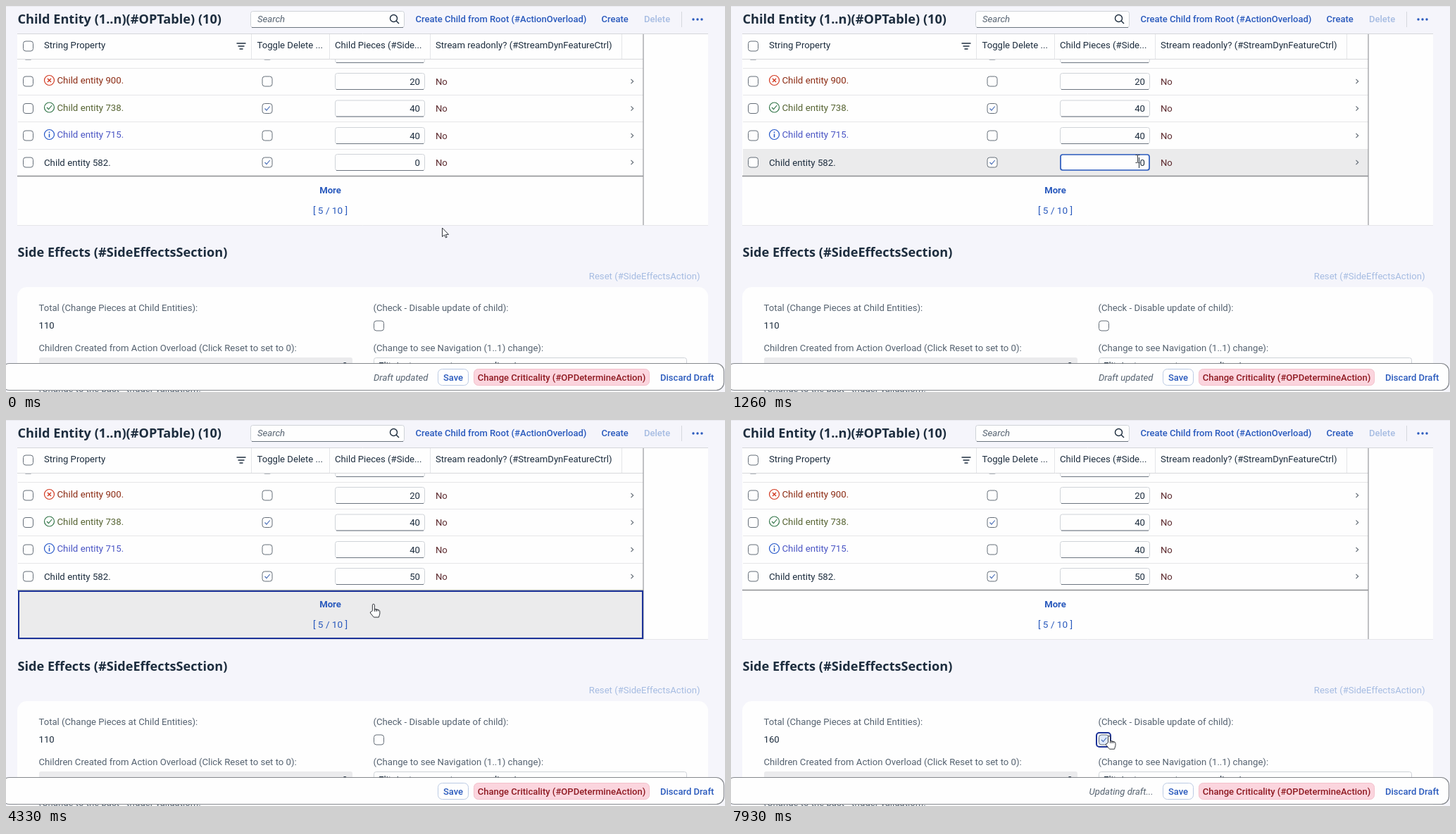
An HTML page with a canvas that plays this animation: 1021x548 px, repeating every 8 s.

```html
<!DOCTYPE html>
<html lang="en">
<head>
<meta charset="utf-8">
<title>Child entity table</title>
<style>
  html, body { margin: 0; width: 100%; height: 100%; overflow: hidden; background: #f5f5fb; }
  canvas { display: block; }
</style>
</head>
<body>
<canvas id="stage" width="1021" height="548"></canvas>
<script>
const ctx = document.getElementById('stage').getContext('2d');
const LOOP = 8000;
const INK = '#1d2d3e', LABEL = '#556270', BLUE = '#2a5abd', FOCUS = '#1d3399', FAINT_BLUE = '#a6bce2';
const PAGE = '#f5f5fb', WHITE = '#fefefe', HOVER = '#ebebec', EDGE = '#656e78', RULE = '#e6e6e8';
const TABLE_RIGHT = 905;

const rows = [
  { y: 107, name: 'Child entity 900.', color: '#8c2c14', icon: 'error', iconColor: '#d23a22', on: false, pieces: '20' },
  { y: 145.5, name: 'Child entity 738.', color: '#566332', icon: 'success', iconColor: '#34774a', on: true, pieces: '40' },
  { y: 184, name: 'Child entity 715.', color: '#4a55c4', icon: 'info', iconColor: '#2456c8', on: false, pieces: '40' },
  { y: 222, name: 'Child entity 582.', color: INK, on: true, pieces: '0' }
];

// Pointer hotspot: time, x, y
const pointerPath = [
  [0, 619.5, 315], [60, 619.5, 315], [600, 583, 166], [930, 577.5, 217], [3000, 577.5, 217],
  [3660, 530, 230], [3930, 530, 230], [4060, 524, 232], [4730, 518, 318], [5330, 515.5, 341],
  [5600, 518, 365], [6400, 532, 453], [7000, 532, 453], [7330, 536, 451], [7800, 536, 451],
  [7930, 537, 450], [LOOP, 537, 450]
];
const pointerShapes = {
  arrow: new Path2D('M0 0V12.5l3-2.5 2 4 1.7-.8-1.9-3.8H9z'),
  hand: new Path2D('M-1.5 8V0a1.5 1.5 0 0 1 3 0V5.5l5.5 1.2q2 .5 2 2.5v3l-1.5 5h-7l-5-6q-.5-2 1.5-2z'),
  beam: new Path2D('M-3-5.5H-1L0-5L1-5.5H3M0-5V5M-3 5.5H-1L0 5L1 5.5H3')
};

function text(str, x, y, { color = INK, style = '', size = 13.13, family = 'Roboto', align = 'left' } = {}) {
  ctx.font = `${style} ${size}px ${family}, sans-serif`;
  ctx.fillStyle = color;
  ctx.textAlign = align;
  ctx.fillText(str, x, y);
}
const heading = (str, y) => text(str, 16.5, y, { style: 'bold', size: 18.15, family: '"Noto Sans"' });
const button = (str, x, y, color = BLUE, align) => text(str, x, y, { color, style: '500', size: 13.03, align });

function fill(x, y, w, h, color) {
  ctx.fillStyle = color;
  ctx.fillRect(x, y, w, h);
}
function box(x, y, w, h, radius, color, border, width = 1) {
  ctx.beginPath();
  ctx.roundRect(x, y, w, h, radius);
  if (color) { ctx.fillStyle = color; ctx.fill(); }
  if (border) { ctx.strokeStyle = border; ctx.lineWidth = width; ctx.stroke(); }
}
function line(points, color, width = 1) {
  ctx.beginPath();
  for (let i = 0; i < points.length; i += 2) ctx.lineTo(points[i], points[i + 1]);
  ctx.strokeStyle = color;
  ctx.lineWidth = width;
  ctx.stroke();
}
function circle(x, y, r, color, width = 1.3) {
  ctx.beginPath();
  ctx.arc(x, y, r, 0, 2 * Math.PI);
  ctx.strokeStyle = color;
  ctx.lineWidth = width;
  ctx.stroke();
}
function clipped(x, y, w, h, draw) {
  ctx.save();
  ctx.beginPath();
  ctx.rect(x, y, w, h);
  ctx.clip();
  draw();
  ctx.restore();
}

function tick(x, y, color = '#4a6fb8') {
  line([x - 3.5, y, x - 1, y + 2.7, x + 3.7, y - 3], color, 1.15);
}
function checkbox(x, y, on, color = WHITE) {
  box(x - 7, y - 7, 14, 14, 3.5, color, EDGE, 1);
  if (on) tick(x, y);
}
function field(x, y, w, h, focused, hovered) {
  if (focused) return box(x + 1, y + 1, w - 2, h - 2, 3, WHITE, BLUE, 1.7);
  box(x + .5, y + .5, w - 1, h - 1, 3, WHITE, hovered ? '#b4c6e8' : '#cfd3d8');
  line([x + 2, y + h - .5, x + w - 2, y + h - .5], hovered ? '#7d9bd0' : '#6c7580');
}
function statusIcon({ icon, iconColor }, x, y) {
  circle(x, y, 7, iconColor, 1.2);
  if (icon === 'success') tick(x, y, iconColor);
  if (icon === 'error') {
    line([x - 2.5, y - 2.5, x + 2.5, y + 2.5], iconColor, 1.4);
    line([x + 2.5, y - 2.5, x - 2.5, y + 2.5], iconColor, 1.4);
  }
  if (icon === 'info') {
    line([x, y - 1, x, y + 4], iconColor, 1.5);
    line([x, y - 4, x, y - 2.3], iconColor, 1.5);
  }
}

function pointerAt(t) {
  const i = pointerPath.findIndex(p => p[0] > t);
  const [t0, x0, y0] = pointerPath[i - 1], [t1, x1, y1] = pointerPath[i];
  const u = (t - t0) / (t1 - t0), e = u * u * (3 - 2 * u);
  return { x: x0 + (x1 - x0) * e, y: y0 + (y1 - y0) * e };
}
const inside = (p, x, y, w, h) => p.x >= x && p.x <= x + w && p.y >= y && p.y < y + h;
const overField = (p, row) => inside(p, 467, row.y - 12, 128, 24);

function stateAt(t) {
  const pointer = pointerAt(t);
  const hoverRow = rows.find(r => inside(pointer, 17, r.y - 19, TABLE_RIGHT - 17, 38));
  const hoverMore = inside(pointer, 17, 242, TABLE_RIGHT - 17, 69);
  const hoverCheck = inside(pointer, 516, 441, 26, 26);
  const editing = t >= 1060 && t < 3400;
  const blinkStart = t < 1930 ? 1200 : 1930;
  return {
    pointer, hoverRow, hoverMore, hoverCheck, editing,
    shape: hoverRow && overField(pointer, hoverRow) ? 'beam'
      : hoverRow || hoverMore || hoverCheck ? 'hand' : 'arrow',
    caret: editing && (t < blinkStart || (t - blinkStart) % 1070 < 530),
    pieces: t < 1930 ? '0' : '50',
    moreFocused: t >= 3400 && t < 6400,
    checkFocused: t >= 6400,
    checkAlpha: Math.min(1, Math.max(0, (t - 6500) / 500)),
    total: t < 6060 ? '110' : '160',
    draft: t < 1930 ? 'Draft updated' : t < 5660 ? '' : t < 6060 ? 'Updating draft...'
      : t < 7200 ? 'Draft updated' : t < 7800 ? '' : 'Updating draft...'
  };
}

function drawToolbar() {
  fill(0, 0, 1021, 1, '#e9e9ef');
  heading('Child Entity (1..n)(#OPTable) (10)', 25);
  field(347, 7, 219, 24);
  text('Search', 357, 23, { style: 'italic', color: LABEL });
  circle(550.5, 17.5, 5, INK, 1.4);
  line([554, 21, 558, 25], INK, 1.5);
  button('Create Child from Root (#ActionOverload)', 581.5, 23);
  button('Create', 845.5, 23);
  button('Delete', 906, 23, FAINT_BLUE);
  line([959.5, 8, 959.5, 30], '#d5d8de');
  for (const x of [976, 982, 988]) {
    ctx.beginPath();
    ctx.arc(x, 19, 1.7, 0, 2 * Math.PI);
    ctx.fillStyle = BLUE;
    ctx.fill();
  }
}

function drawRow(row, s) {
  const { y } = row, last = row === rows[3], hovered = row === s.hoverRow;
  if (hovered) fill(17, y - 18.5, TABLE_RIGHT - 17, 38, HOVER);
  checkbox(31.5, y, false);
  if (row.icon) statusIcon(row, 61.5, y - 1.5);
  text(row.name, row.icon ? 72.5 : 54, y + (row.icon ? 3.3 : 4.8), { color: row.color, size: 13.25 });
  checkbox(371, y, row.on);
  field(467, y - 12, 128, 24, last && s.editing, hovered && overField(s.pointer, row));
  text(last ? s.pieces : row.pieces, 588, y + 4.8, { align: 'right' });
  if (last && s.caret) fill(579, y - 7, 1, 15, INK);
  text('No', 610, y + 4.8, { color: '#5c2a2e' });
  line([887.5, y - 3.2, 890.7, y, 887.5, y + 3.2], EDGE, 1.2);
  if (!last) line([17, Math.floor(y + 19) + .5, TABLE_RIGHT, Math.floor(y + 19) + .5], RULE);
}

function drawTable(s) {
  fill(16, 39, 981, 272, WHITE);
  clipped(16, 75, 889, 14, () => {
    checkbox(31.5, 69, false);
    checkbox(371, 69, false);
    field(467, 57, 128, 24);
  });
  line([17, 88.5, TABLE_RIGHT, 88.5], RULE);
  rows.forEach(row => drawRow(row, s));

  line([16, 39.5, 997, 39.5], '#d5d6da');
  line([16, 75.5, TABLE_RIGHT, 75.5], '#d8d9dc');
  for (const x of [348.5, 459.5, 602.5, 874.5]) line([x, 40, x, 75], '#e4e5e8');
  checkbox(31.5, 57, false);
  text('String Property', 54, 59.5);
  text('Toggle Delete ...', 356.5, 59.5);
  text('Child Pieces (#Side...', 467, 59.5);
  text('Stream readonly? (#StreamDynFeatureCtrl)', 610, 59.5);
  [[53, 6.5], [57, 4.5], [61, 2.5]].forEach(([y, half]) => line([334 - half, y, 334 + half, y], INK, 1.5));

  if (s.hoverMore) fill(17, 242, TABLE_RIGHT - 17, 69, HOVER);
  line([16, 241.5, TABLE_RIGHT, 241.5], s.moreFocused ? '#b4bcb9' : '#8b8d91', 1.4);
  line([TABLE_RIGHT, 40, TABLE_RIGHT, 311], '#96989c', 1.2);
  line([16, 311.5, 997, 311.5], '#e5e6ea');
  text('More', 460.5, 266, { style: 'bold', color: BLUE, align: 'center' });
  text('[ 5 / 10 ]', 460.5, 295, { color: BLUE, align: 'center', size: 13.6 });
  if (s.moreFocused) box(18, 243, 886, 67, 0, null, FOCUS, 2);
}

function drawSection(s) {
  heading('Side Effects (#SideEffectsSection)', 356);
  text('Reset (#SideEffectsAction)', 985.5, 388, { color: FAINT_BLUE, align: 'right' });
  box(16, 399, 981, 180, 14, WHITE);
  const label = (str, x, y) => text(str, x, y, { color: LABEL });
  label('Total (Change Pieces at Child Entities):', 46.5, 433);
  text(s.total, 46.5, 458);
  label('Children Created from Action Overload (Click Reset to set to 0):', 46.5, 490);
  label('(Check - Disable update of child):', 521.5, 433);
  label('(Change to see Navigation (1..1) change):', 521.5, 490);

  checkbox(529.5, 454, false, s.hoverCheck ? '#e0eafa' : WHITE);
  ctx.globalAlpha = s.checkAlpha;
  tick(529.5, 454);
  ctx.globalAlpha = 1;
  if (s.checkFocused) box(519, 444, 20, 20, 4, null, FOCUS, 2);

  box(47, 499, 445, 24, 3, '#ebebed');
  text('0', 485, 515, { align: 'right' });
  field(522, 499, 445, 24);
  text('Elitr justo magna tempor sadipscing nonumy.', 529, 515);
  line([949, 508, 953, 512, 957, 508], INK, 1.3);
}

function drawFooter(s) {
  box(-6, 507.5, 1025.5, 38, 11, WHITE, '#85888d', 1.2);
  clipped(0, 546, 1021, 2, () => {
    fill(0, 546, 1021, 2, PAGE);
    fill(16, 546, 981, 2, WHITE);
    text('(Change to the past - trigger validation):', 46.5, 547.5, { color: LABEL });
  });
  text(s.draft, 599.5, 531.5, { style: 'italic', color: LABEL, align: 'right' });
  box(613.5, 515.5, 43, 23, 6, WHITE, '#bccbe4');
  button('Save', 635, 531.5, BLUE, 'center');
  box(664.5, 515.5, 249, 23, 6, '#fbd5de', '#f3c0cb');
  button('Change Criticality (#OPDetermineAction)', 789, 531.5, '#8f1a22', 'center');
  button('Discard Draft', 929, 531.5);
}

function drawPointer({ pointer, shape }) {
  const outline = '#33373d';
  ctx.save();
  ctx.translate(pointer.x, pointer.y);
  ctx.lineWidth = 1;
  ctx.lineJoin = 'round';
  ctx.strokeStyle = outline;
  ctx.fillStyle = '#fff';
  if (shape !== 'beam') ctx.fill(pointerShapes[shape]);
  ctx.stroke(pointerShapes[shape]);
  if (shape === 'hand') line([1.5, 5.5, 1.5, 9, 1.5, 5.5, 4, 6.2, 4, 9, 4, 6.2, 6.5, 6.8, 6.5, 9], outline, .8);
  ctx.restore();
}

function frame(now) {
  const s = stateAt(now % LOOP);
  fill(0, 0, 1021, 548, PAGE);
  drawToolbar();
  drawTable(s);
  drawSection(s);
  drawFooter(s);
  drawPointer(s);
  requestAnimationFrame(frame);
}
requestAnimationFrame(frame);
</script>
</body>
</html>
```
